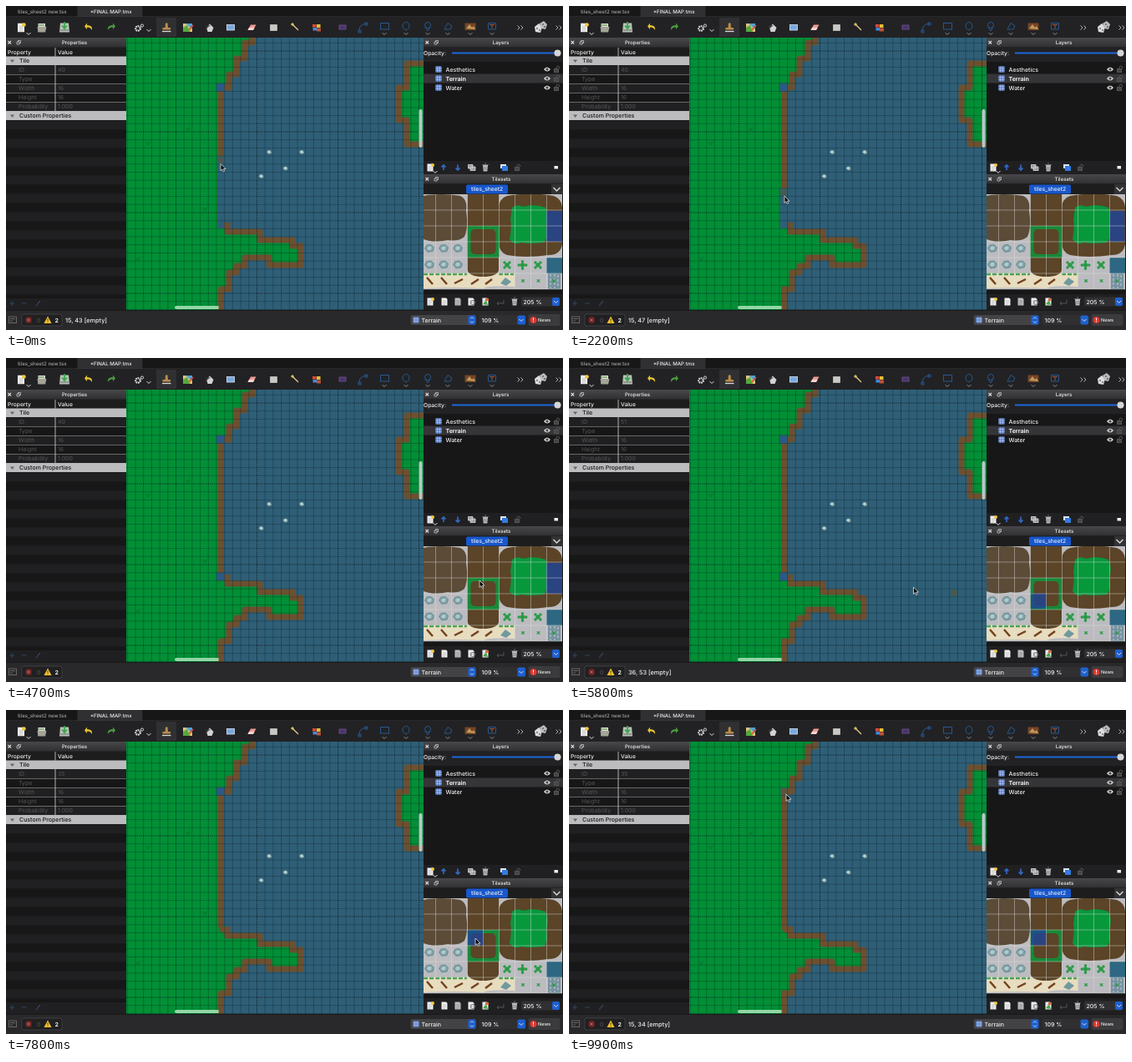
Recreate the animation shown at these times as an HTML page. Size 667 px wide and 389 px high, loop 10000 ms.

```html
<!DOCTYPE html>
<html lang="en">
<head>
<meta charset="utf-8">
<title>Tile map editor</title>
<style>
html, body { margin: 0; width: 100%; height: 100%; overflow: hidden; background: #1d1d1e; }
svg { display: block; }
text { font: 500 7px Inter, "Liberation Sans", sans-serif; fill: #f0f0f0; white-space: pre; text-rendering: geometricPrecision; }
.small { font-size: 6.1px; }
.mid { font-size: 6.7px; }
.status { font-size: 7.3px; }
.bold { font-weight: 700; }
.center { text-anchor: middle; }
.dim { fill: #555; font-weight: 400; }
.dark { fill: #161616; }
.line { fill: none; stroke: #d6d6d6; }
.blue { fill: none; stroke: #27578f; stroke-width: 1; }
.soil { fill: #6c5030; }
.brown { fill: none; stroke: #6c5030; stroke-width: 7; stroke-linejoin: round; }
.earth { fill: #5b4427; }
</style>
</head>
<body>
<svg width="667" height="389" viewBox="0 0 667 389">
<defs>
  <linearGradient id="bar" x2="0" y2="1"><stop stop-color="#48484a"/><stop offset="1" stop-color="#303032"/></linearGradient>
  <g id="doc"><path d="M-3.5-4.500H2L3.500-3V4.500H-3.500Z" fill="#eee"/><path d="M-2-1H2M-2 1H2M-2 3H1" stroke="#aaa" stroke-width=".6"/></g>
  <g id="newdoc"><use href="#doc"/><circle cx="3" cy="-3" r="2" fill="#f0c83a"/></g>
  <g id="layer"><rect x="-3.700" y="-3.700" width="7.400" height="7.400" fill="#5277c4"/><path d="M-3.700-1.300H3.700M-3.700 1.300H3.700M-1.300-3.700V3.700M1.300-3.700V3.700" stroke="#b9c9ec" stroke-width=".7"/></g>
  <g id="eye"><path d="M-4 0Q0-5 4 0Q0 5-4 0Z" fill="#ddd"/><circle r="1.600" fill="#222"/><circle r=".6" fill="#eee"/></g>
  <g id="lock" fill="none" stroke="#555"><rect x="-2.500" y="-.5" width="5" height="4" fill="#444"/><path d="M0-.5V-2A1.800 1.800 0 0 1 3.600-2V-1"/></g>
  <path id="chev" d="M-2.500-1L0 1.500L2.500-1" fill="none" stroke="#ddd"/>
  <path id="more" d="M-3.500-2.500L-1 0L-3.500 2.500M.5-2.500L3 0L.5 2.500" class="line" stroke-width=".8"/>
  <g id="close"><path d="M2.500 42L6 45.500M6 42L2.500 45.500" class="line" stroke-width="1.200"/><path d="M13 43H16V46H13ZM14.500 43V41.500H17.500V44.500H16" class="line" stroke-width=".7"/></g>
  <g id="trash"><path d="M-3-3H3L2.300 4.500H-2.300Z" fill="#bbb"/><path d="M-4-3.500H4M-1-5H1M-1-1V3M1-1V3" stroke="#777" stroke-width=".8"/></g>
  <g id="rock"><path d="M-5.500 0L-3-4L2-4.500L5.500-1L4 3.500L-2 4.500Z" fill="#7fa3a8" stroke="#557d86" stroke-width=".7"/><path d="M-3 0L-1-2.500L2.500-2L2 1.500L-1 2Z" fill="#b3cacc"/></g>
  <g id="bush" fill="#2a9a46"><circle r="2.800"/><circle cx="-3" cy="-3" r="1.700"/><circle cx="3" cy="-3" r="1.700"/><circle cx="-3" cy="3" r="1.700"/><circle cx="3" cy="3" r="1.700"/></g>
  <clipPath id="mapClip"><rect x="144" y="38" width="356" height="327"/></clipPath>
  <clipPath id="sheetClip"><rect x="500" y="226" width="166" height="120"/></clipPath>
</defs>

<!-- tabs and toolbar -->
<rect width="667" height="389" fill="#1d1d1e"/>
<rect width="667" height="13" fill="#171718"/>
<rect x="86" width="77" height="13" fill="#303032"/>
<path d="M86 0V13M163 0V13M0 12.700H667" stroke="#3c3c3e" stroke-width=".6"/>
<text class="small" x="14" y="9" fill-opacity=".65">tiles_sheet2 new.tsx</text>
<text class="small" x="101" y="9">*FINAL MAP.tmx</text>
<rect y="13" width="667" height="25" fill="#222224"/>
<rect x="180" y="14" width="24" height="23" fill="#303032"/>
<use href="#newdoc" transform="translate(18 26) scale(1.150)"/><use href="#chev" x="27" y="33"/>
<path d="M38.500 21H47V31H38.500Z" fill="#ddd"/><path d="M37.500 25H48.500L47 31.500H38.500Z" fill="#a3a497"/><path d="M39 23H46" stroke="#699c52" stroke-width="1.300"/>
<path d="M65 20.500H75L76 31.500H64Z" fill="#b9c3b9"/><path d="M70 19V26M67 23.500L70 27L73 23.500" stroke="#38a64a" stroke-width="1.800" fill="none"/><path d="M65 29H75" stroke="#666"/>
<path d="M103 29Q104 23 97 23V20.500L94 24.500L97 28V25.500Q101 25 103 29Z" fill="#e8c530"/>
<path d="M122 29Q121 23 128 23V20.500L131 24.500L128 28V25.500Q124 25 122 29Z" fill="#4c9a41"/>
<circle cx="158" cy="27" r="2.800" fill="none" stroke="#ddd" stroke-width="2.200" stroke-dasharray="1.700 .8"/><circle cx="163" cy="23.500" r="1.600" class="line"/><use href="#chev" x="171" y="29"/>
<path d="M191 20.500H193.500L194 26H197V28.500H187.500V26H190.500Z" fill="#b98b4a"/><path d="M187 30.500H197.500" stroke="#d9d9d9" stroke-width="1.300"/>
<rect x="212" y="21" width="11" height="10" fill="#d9c277"/><path d="M212 31V26L217 23L220 31Z" fill="#55a83d"/><path d="M215 21H223V28Z" fill="#53a0d2"/><path d="M219 29L224 23" stroke="#d94c36" stroke-width="1.600"/>
<path d="M240 25.500L244 21.500L248.500 26L246.500 31H241.500Z" fill="#d2d2d2"/><path d="M238 24L245 23L240 27Z" fill="#333"/>
<rect x="264.500" y="22.500" width="9" height="6.500" fill="#79a9df" stroke="#d5e4f5" stroke-width=".8"/>
<path d="M289.500 29L293 22.500H299.500L296 29Z" fill="#ef9a94"/><path d="M289.500 29L291 26H297.500L296 29Z" fill="#f4d5cf"/>
<rect x="316.500" y="22.500" width="8" height="7" fill="#c9c9c1" stroke="#eee" stroke-dasharray="1 1"/>
<path d="M343 22L350 29" stroke="#d8c18a" stroke-width="1.400"/><path d="M343 20V24M341 22H345" stroke="#f2d65e"/>
<path d="M367 22H371.500V25.500H367Z" fill="#dc4b36"/><path d="M372 22H376.500V26H372Z" fill="#e4bd39"/><path d="M367.500 26H372V29.500H367.500Z" fill="#4687d8"/><path d="M372 26.500H377V30.500H372Z" fill="#bb5139"/>
<rect x="399" y="23" width="8" height="5" fill="#4b3268" stroke="#74539a" stroke-width=".8"/>
<path class="blue" d="M423 31Q422 22 432 21M422 29H425V32H422ZM430 20H433V23H430Z"/>
<g class="blue"><rect x="448.500" y="20.500" width="10" height="7.500"/><ellipse cx="479" cy="24" rx="4" ry="4.500"/><circle cx="505" cy="23" r="3.500"/><path d="M502 25L505 30L508 25M525 28L529 20.500L534 24L532 28Z"/></g>
<rect x="549.500" y="20.500" width="13" height="8.500" fill="#754523"/><path d="M551 27L555 22L558 26L560 24L562 28Z" fill="#c09a63"/>
<path class="blue" d="M577.500 20.500H586.500V28H577.500Z"/><path d="M579 22.500H585M582 22.500V27" stroke="#9b5540"/>
<g id="arrows" opacity=".55"></g>
<use href="#more" x="616" y="26"/><use href="#more" x="662" y="26"/>
<path d="M633 25L638 21L642 25L640 32L634 31Z" fill="#ddd"/><path d="M639 21L644 18L648 22L646 28L641 27Z" fill="#bbb"/><g fill="#222"><circle cx="636" cy="27" r=".8"/><circle cx="639" cy="29" r=".8"/><circle cx="643" cy="22" r=".8"/><circle cx="645" cy="25" r=".8"/></g>

<!-- properties -->
<rect y="38" width="144" height="11.500" fill="url(#bar)"/>
<use href="#close"/><text class="small center" x="82" y="46.300">Properties</text>
<text class="mid" x="2" y="57.500">Property</text><text class="mid" x="62" y="57.500">Value</text>
<g id="props"></g>
<path d="M59 50V60.500M59 71V126" stroke="#d8d8da" stroke-width=".8"/>
<rect y="351" width="144" height="14" fill="#202022"/>
<path d="M4 357H10M7 354V360M19 357H25M36 360L41 354" stroke="#2f4260" stroke-width="1.200"/>

<!-- map -->
<g clip-path="url(#mapClip)">
  <rect x="144" y="38" width="356" height="327" fill="#2f5f77"/>
  <path d="M144 36H295V44H286V63H276V82H267V98H262V93H253V267H265V271H304V281H343V288H353V311H315V302H286V312H276V320H267V340H257V366H144Z" fill="#028f36"/>
  <path class="brown" d="M295 34V44H286V63H276V82H267V98H261M265 260V271H304V281H343V288H353V311H315V302H286V312H276V320H267V340H257.500V368"/>
  <path class="brown" d="M504 69H480V98H470V137H480V166H504" style="fill:#028f36"/>
  <g id="grass" fill="none" stroke="#08702b" stroke-width=".7"></g>
  <rect id="topHole" x="252" y="92.800" width="9.500" height="9.700"/>
  <rect id="lowHole" x="252" y="257.700" width="9.500" height="9.700"/>
  <rect x="253" y="102.500" width="2" height="0" id="bank" fill="#028f36"/>
  <rect id="shore" class="soil" x="254" y="102.500" width="7"/>
  <path id="topPatch" class="soil" d="M254 104V98Q254 94 258 94H264V101H261V104Z"/>
  <path id="lowPatch" class="soil" d="M254 257H261V261H268V268H261Q254 267 254 257Z"/>
  <g id="stamp"><rect width="9.700" height="9.700" fill="#2d6289" opacity=".3"/><rect x="1.500" y="1" width="7.500" height="8" rx="1.500" fill="#6c5030" stroke="#247044" opacity=".55"/></g>
  <g id="rocks"></g>
  <path id="minor" fill="none" stroke="#07151c" stroke-width=".65" opacity=".42"/>
  <path id="major" fill="none" stroke="#071014" stroke-width=".8" stroke-dasharray="1.500 1" opacity=".8"/>
  <rect x="202" y="360" width="53" height="4" rx="2" fill="#92d6a5"/>
  <rect x="494.500" y="124" width="4" height="46" rx="2" fill="#b4cbc7"/>
</g>

<!-- layers -->
<rect x="500" y="38" width="167" height="11.500" fill="url(#bar)"/>
<use href="#close" x="500"/><text class="small center" x="592.500" y="46.300">Layers</text>
<rect x="500" y="49.500" width="167" height="17.500" fill="#222224"/>
<text class="mid" x="500" y="59">Opacity:</text>
<path d="M534 56.500H660" stroke="#1f67d8" stroke-width="1.800"/><circle cx="660.500" cy="56.500" r="4" fill="#d5d5d7"/>
<rect x="500" y="67" width="167" height="119" fill="#171718"/>
<rect x="500" y="81.500" width="167" height="11" fill="#353538"/>
<g id="layers"></g>
<rect x="500" y="186" width="167" height="16" fill="#202022"/>
<use href="#newdoc" x="508" y="194"/><use href="#chev" x="514" y="199"/>
<path d="M524 197V191M521.500 193.500L524 191L526.500 193.500M541 190.500V196.500M538.500 194.500L541 197L543.500 194.500" fill="none" stroke="#3269c4" stroke-width="1.700"/>
<path d="M553.500 190.500H559V195H553.500ZM556 193H562V197.500H556Z" fill="#999" stroke="#ddd" stroke-width=".8"/>
<use href="#trash" x="574" y="194"/>
<path d="M592 190H599V195H592Z" fill="#d9e5f5"/><path d="M594 192H601V198H594Z" fill="#3479e0"/>
<use href="#lock" x="612" y="194"/><rect x="656.500" y="192" width="4.500" height="3.500" fill="#eee"/>

<!-- tilesets -->
<rect x="500" y="202" width="167" height="11.500" fill="url(#bar)"/>
<use href="#close" x="500" y="164"/><text class="small center" x="593" y="210.300">Tilesets</text>
<rect x="500" y="213.500" width="167" height="12.500" fill="#1d1d1e"/>
<rect x="551" y="214.500" width="50" height="11" rx="2" fill="#1757cc"/><text class="mid center" x="576" y="222.300">tiles_sheet2</text>
<rect x="653" y="214" width="14" height="12" fill="#333335"/><path d="M655.500 218L659.500 222L663.500 218" class="line" stroke-width="1.500"/>
<g clip-path="url(#sheetClip)">
  <rect x="500" y="226" width="167" height="120" fill="#bcbcc0"/>
  <path d="M500 228Q522 224 544 228Q553 232 551 246Q554 266 549 277Q542 283 529 281Q512 285 500 280Z" fill="#5b4b37"/>
  <rect class="earth" x="552.500" y="226" width="38" height="76"/>
  <path class="earth" d="M600 228Q628 223 656 228Q667 232 666 246V286Q664 299 650 299Q622 303 600 299Q588 295 590 278V244Q590 231 600 228Z"/>
  <path d="M606 242Q612 237 619 241Q633 237 646 242Q651 252 647 264Q650 278 644 284Q626 286 617 284Q608 288 603 280Q606 266 604 256Z" fill="#07983c"/>
  <rect x="552.500" y="264" width="38" height="38" fill="#168a39"/><rect class="earth" x="556.500" y="268" width="30" height="30" rx="5"/>
  <rect x="647" y="302" width="20" height="19" fill="#2d6782"/>
  <path d="M500 321H609V337Q580 335 571 339Q536 337 500 339Z" fill="#e8dcbf"/>
  <path class="earth" d="M552.500 302H590V317Q588 325 571 325Q555 325 552.500 317Z"/>
  <path d="M500 322H552M590 322H608" stroke="#3e9c46" stroke-width="2.500" stroke-dasharray="5 2"/>
  <path d="M504 326L511 334M521 326L528 334M537 333L547 328M557 334L566 328M574 334L582 328" stroke="#73431f" stroke-width="2.500"/>
  <path d="M592 333L598 326L605 331L599 336Z" fill="#6f9aa0"/>
  <rect x="649" y="321" width="15" height="19" fill="#78929f"/><path d="M652 322V339M657 322V339M661 323V337" stroke="#bfd0d6" stroke-dasharray="3 2"/>
  <rect x="500" y="340" width="167" height="6" fill="#171718"/>
  <g id="sheetParts"></g>
  <rect id="pick" width="18.500" fill="#1d459b" opacity=".78"/>
  <path id="sheetGrid" fill="none" stroke="#e2e2e2" stroke-width=".7" opacity=".6"/>
</g>
<rect x="500" y="346" width="167" height="19" fill="#202022"/>
<use href="#newdoc" x="508" y="355"/><use href="#doc" x="525" y="355"/><g opacity=".75"><use href="#doc" x="541" y="355"/></g>
<use href="#doc" x="557" y="355"/><circle cx="559" cy="356" r="2.500" fill="none" stroke="#777"/>
<use href="#doc" x="574" y="355"/><path d="M571 358L575 353L577 359Z" fill="#45a84b"/><path d="M574 351H578V354H574Z" fill="#dc6942"/>
<path d="M588 357H596V353M590 355L588 357L590 359" fill="none" stroke="#555"/>
<use href="#trash" x="609" y="355"/>
<rect x="617" y="349.500" width="46" height="11" rx="2" fill="#303032"/><text x="619.500" y="357.700">205 %</text>
<rect x="654" y="350" width="9" height="10" rx="2" fill="#1d60d0"/><use href="#chev" x="658.500" y="355"/>

<!-- status -->
<rect y="365" width="667" height="24" fill="#29292b"/><path d="M0 365.300H667" stroke="#111" stroke-width=".7"/>
<rect x="3.500" y="373" width="9" height="7.500" fill="none" stroke="#666"/><path d="M5 375.500H11M5 378H8" stroke="#666"/>
<rect x="19" y="370" width="48" height="14" rx="2" fill="#202022" stroke="#4a4a4c" stroke-width=".7"/>
<circle cx="27" cy="377" r="4" fill="#6e2225"/><path d="M25.500 375.500L28.500 378.500M28.500 375.500L25.500 378.500" stroke="#a77"/>
<text class="dim" x="37" y="379.700">0</text>
<path d="M50 372.500L54.500 381H45.500Z" fill="#f1c12f"/><path d="M50 375.500V378M50 379V380" stroke="#4b3b08"/>
<text class="bold" x="58.500" y="379.700">2</text>
<text id="status" class="status" x="71" y="379.800"></text>
<rect x="484.500" y="371" width="78" height="12" rx="2" fill="#434345"/><use href="#layer" x="491" y="377"/><text x="497.500" y="379.600">Terrain</text>
<rect x="553.500" y="371.500" width="9" height="11" rx="2" fill="#1d60d0"/><path d="M556 375.500L558 373.500L560 375.500M556 378.500L558 380.500L560 378.500" class="line"/>
<rect x="566.500" y="371" width="56" height="12" rx="2" fill="#303032"/><text x="569.500" y="379.700">109 %</text>
<rect x="612.500" y="371.500" width="9.500" height="11" rx="2" fill="#1d60d0"/><use href="#chev" x="617" y="377"/>
<rect x="625.500" y="370" width="38" height="14" rx="2" fill="#3b3b3d"/><circle cx="631.500" cy="377" r="4" fill="#e1372f"/><path d="M631.500 374.500V377.500M631.500 378.500V379.500" stroke="#fff"/>
<text style="font-size:5.600px" x="637" y="379">News</text>

<path id="cursor" d="M0 0V8.300L1.900 6.600L3.300 9.500L4.700 8.800L3.400 6.100H6Z" fill="#080808" stroke="#eee" stroke-width=".75"/>
</svg>
<script>
const $ = id => document.getElementById(id);
const CELL = 9.7, LOOP = 10000, STEP = 100;
const LAND = '#028f36', HOLE = '#2b5a85';
const colX = c => 300.5 + (c - 20) * CELL;
const rowY = r => 248 + (r - 50) * CELL;
const add = (id, markup) => $(id).insertAdjacentHTML('beforeend', markup);

function buildProperties() {
  const names = ['ID', 'Type', 'Width', 'Height', 'Probability'];
  const values = ['', '', '16', '16', '1.000'];
  let out = '';
  for (let i = 0; i < 27; i++) {
    const y = 60.5 + i * 11;
    const group = i === 0 ? 'Tile' : i === 6 ? 'Custom Properties' : '';
    const fill = group ? '#bcbcbe' : i % 2 ? '#202022' : '#171718';
    out += `<rect y="${y}" width="144" height="${group ? 10.5 : 11}" fill="${fill}"/>`;
    if (group) {
      out += `<path d="M5 ${y + 4}H10L7.500 ${y + 7.5}Z" fill="#666"/><text class="dark" x="16" y="${y + 7.7}">${group}</text>`;
    } else if (i < 6) {
      out += `<path d="M0 ${y + 11}H144" stroke="#d8d8da" stroke-width=".8"/>
        <text class="dim" x="15" y="${y + 7.7}">${names[i - 1]}</text>
        <text class="dim" x="62" y="${y + 7.7}" ${i === 1 ? 'id="tileId"' : ''}>${values[i - 1]}</text>`;
    }
  }
  add('props', out);
}

function buildMap() {
  let minor = '', major = '';
  for (let c = 4; c < 41; c++) {
    const line = `M${colX(c)} 38V365`;
    c % 10 ? minor += line : major += line;
  }
  for (let r = 28; r < 63; r++) {
    const line = `M144 ${rowY(r)}H500`;
    r % 10 ? minor += line : major += line;
  }
  $('minor').setAttribute('d', minor);
  $('major').setAttribute('d', major);
  for (const [x, y] of [[315, 175.5], [354, 175.5], [334.5, 195], [305.5, 204.5]])
    add('rocks', `<path d="M${x - 3} ${y}L${x - 1} ${y - 2.5}L${x + 2} ${y - 2}L${x + 3} ${y + 1}L${x} ${y + 2.5}Z" fill="#8eb4b5"/><circle cx="${x}" cy="${y - .3}" r="1.300" fill="#c3d3d0"/>`);
  for (const [x, y] of [[170, 165], [218, 148], [238, 244], [158, 304]])
    add('grass', `<path d="M${x - 3} ${y - 2}L${x} ${y + 2}L${x + 3} ${y - 3}M${x} ${y + 2}V${y - 2}"/>`);
}

function buildPanels() {
  ['Aesthetics', 'Terrain', 'Water'].forEach((name, i) => {
    const y = 76 + i * 11;
    add('layers', `<use href="#layer" x="518" y="${y}"/><text class="${i === 1 ? 'bold' : ''}" x="526.500" y="${y + 2.5}">${name}</text><use href="#eye" x="648" y="${y}"/><use href="#lock" x="659" y="${y}"/>`);
  });
  for (const x of [453, 479, 505, 529, 556, 582]) add('arrows', `<use href="#chev" x="${x}" y="33"/>`);

  let grid = '';
  for (let x = 514.5; x < 667; x += 19) grid += `M${x} 226V340`;
  for (let y = 245; y < 341; y += 19) grid += `M500 ${y}H667`;
  $('sheetGrid').setAttribute('d', grid);
  for (let i = 0; i < 6; i++)
    add('sheetParts', `<use href="#rock" x="${507 + i % 3 * 17}" y="${i < 3 ? 291 : 310.5}"/>`);
  for (let i = 0; i < 3; i++) {
    const x = 600 + i * 18.5;
    add('sheetParts', `<use href="#bush" transform="translate(${x} 311) rotate(${i * 45})"/><use href="#bush" transform="translate(${x + 19} 330) scale(.45)"/>`);
  }
}

// time, x, y of the pointer tip
const path = [
  [0, 257, 189.4], [900, 258, 210.5], [1100, 258, 211], [2200, 258, 228],
  [3300, 258, 247], [3600, 258, 254], [3900, 300, 252], [4300, 540, 262],
  [4700, 567, 267], [5200, 563, 290], [5500, 563, 290], [6100, 262, 260],
  [6300, 258, 262], [6600, 258, 262], [6900, 334, 253], [7000, 461, 250],
  [7400, 562, 273], [7800, 562, 274], [8400, 288, 103], [8700, 283, 101],
  [9300, 260, 101], [10000, 260, 101]
];

function pointer(t) {
  const i = Math.max(1, path.findIndex(p => p[0] >= t));
  const [t0, x0, y0] = path[i - 1], [t1, x1, y1] = path[i];
  const k = (t - t0) / (t1 - t0);
  return [x0 + (x1 - x0) * k, y0 + (y1 - y0) * k];
}

const show = (id, on) => $(id).setAttribute('visibility', on ? 'visible' : 'hidden');
const place = (id, x, y) => $(id).setAttribute('transform', `translate(${x} ${y})`);

function render(t) {
  place('cursor', ...pointer(t));

  // the hovered cell trails the pointer by one step
  const [hx, hy] = pointer(Math.max(0, t - STEP));
  const col = Math.floor(20 + (hx - 300) / CELL);
  const row = Math.floor(50 + (hy - 248) / CELL);
  const onMap = hx < 500;
  $('status').textContent = onMap ? `${col}, ${row} [empty]` : '';
  show('stamp', onMap);
  place('stamp', colX(col), rowY(row));

  const tile = t < 5300 ? 40 : t < 7600 ? 51 : 35;
  $('tileId').textContent = tile;
  const [px, py, ph] = { 40: [647, 246, 37], 51: [553, 282.5, 18.5], 35: [553, 264, 18.5] }[tile];
  place('pick', px, py);
  $('pick').setAttribute('height', ph);

  const shoreHeight = (t < 3700 ? rowY(row) : rowY(51)) - 102.5;
  $('shore').setAttribute('height', shoreHeight);
  $('bank').setAttribute('height', shoreHeight);

  const lowDone = t >= 6300, topDone = t >= 9400;
  show('lowHole', t >= 2500);
  show('lowPatch', lowDone);
  show('topPatch', topDone);
  $('lowHole').setAttribute('fill', lowDone ? LAND : HOLE);
  $('topHole').setAttribute('fill', topDone ? LAND : HOLE);
}

buildProperties();
buildMap();
buildPanels();

const start = performance.now();
function tick() {
  const t = (performance.now() - start) % LOOP;
  render(Math.floor(t / STEP) * STEP);
  requestAnimationFrame(tick);
}
tick();
</script>
</body>
</html>
```
